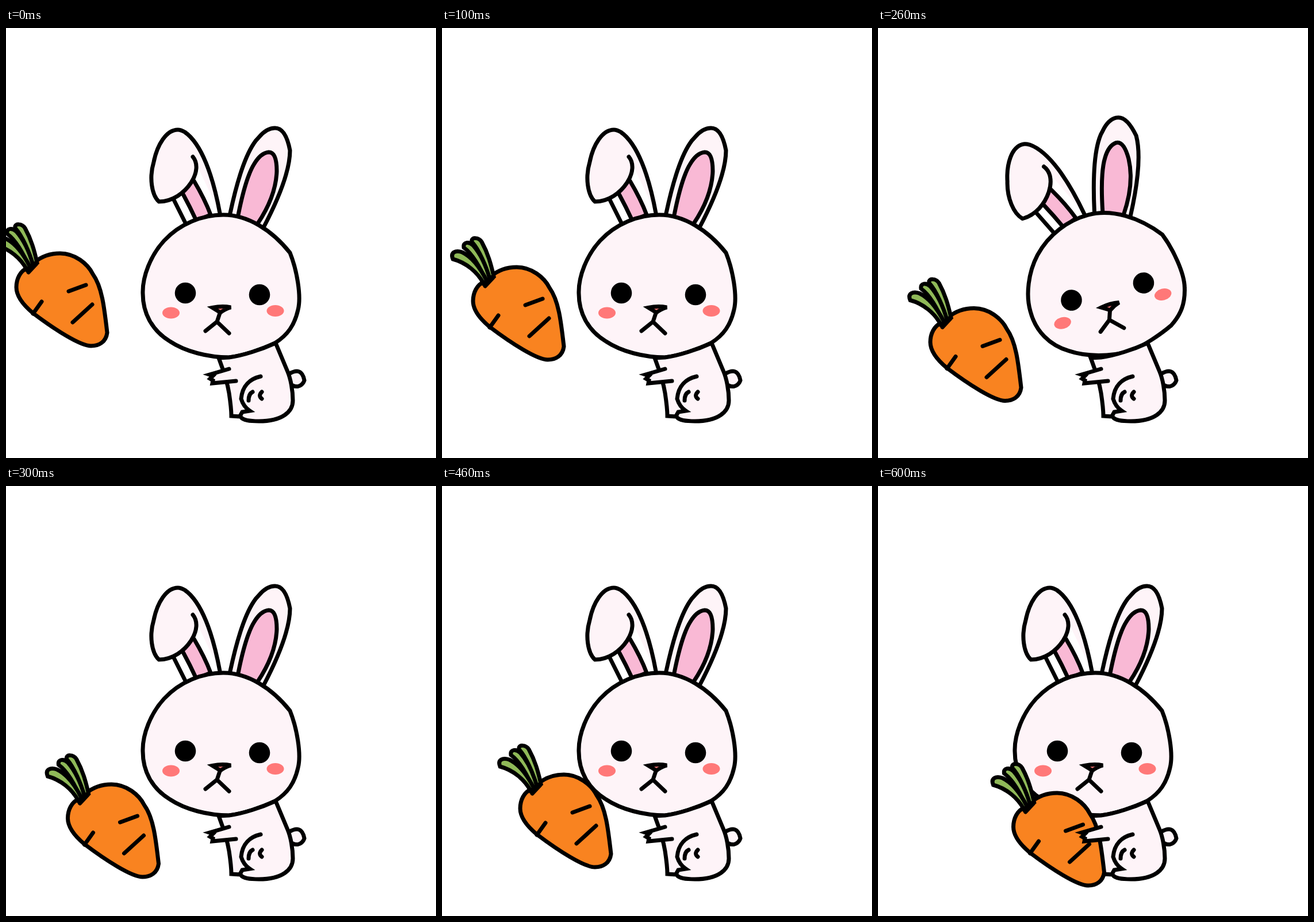
Write an HTML page that moves like this. It is 748 by 748 pixels and loops after 0.7 s.

```html
<!DOCTYPE html>
<html lang="en">
<head>
<meta charset="utf-8">
<title>Rabbit and carrot</title>
<style>
  html, body { margin: 0; width: 100%; height: 100%; overflow: hidden; background: #fff; }
  svg { display: block; width: 100%; height: 100%; }
  path { stroke: #000; stroke-width: 7; stroke-linecap: round; fill: none; }
  .fur { fill: #fef4f8; }
  .pink { fill: #f9b9d5; }
  .blush { fill: #ff7878; }
  .root { fill: #f98320; }
  .leaf { fill: #8fb958; }
</style>
</head>
<body>
<svg viewBox="0 0 748 748">
  <g id="head">
    <!-- folded ear -->
    <path d="M292 299L313 341"/>
    <path class="pink" d="M308 289Q320 311 331 335L356 325Q346 298 327 266"/>
    <path class="fur" d="M325 224C334 235 333 252 322 269C310 287 290 302 266 302C253 290 249 260 257 233C263 203 279 177 299 177Q304 177 311 181C340 201 360 257 372 322"/>
    <!-- upright ear -->
    <path class="fur" d="M390 322C399 280 413 228 431 201Q434 196 440 190C450 178 460 174 468 174C482 174 490 192 494 213C494 250 470 305 448 347"/>
    <path class="pink" d="M404 325C410 295 420 255 432 236C438 226 447 217 457 216C466 216 471 225 471 249C470 280 458 310 438 340"/>
    <!-- face -->
    <path class="fur" d="M494 391C506 421 514 466 508 490C502 517 490 534 468 548C445 559 412 570 388 573C352 573 312 563 285 545C255 527 238 497 238 462C237 432 252 395 275 370C303 340 342 325 378 325C421 325 463 352 494 391Z"/>
    <circle cx="312" cy="461" r="18.3"/>
    <circle cx="441" cy="464" r="18.3"/>
    <ellipse class="blush" cx="287" cy="495.500" rx="15" ry="10"/>
    <ellipse class="blush" cx="468.500" cy="492" rx="15" ry="10"/>
    <path class="blush" d="M359 486.500Q376 483 391 486Q381 489 373 495Z"/>
    <path d="M372 496L367 511L347 527M367 511L388 531"/>
  </g>
  <path class="fur" d="M492 602Q500 597 506 597C514 597 518 606 519 613C516 622 507 626 499 622"/>
  <path class="fur" d="M370 574C376 590 384 610 388 635C391 655 392 665 392 675L408 676C412 683 425 684 440 684C480 684 499 668 499 648C499 630 495 610 490 598L469 548C445 559 412 570 388 573Z"/>
  <path d="M443 606C425 610 411 622 409 645C412 655 418 662 424 666L411 668L407 675M429 633C423 636 422 642 422 648M445 633C440 638 441 642 445 645"/>
  <g id="carrot">
    <path class="root" d="M85 432C98 421 114 416 130 416C156 416 178 434 187 452C203 474 207 510 212 554C210 570 198 577 184 577C165 577 120 548 83 520C65 505 54 490 54 475C54 460 61 447 72 442Z"/>
    <path d="M145 482L175 471M152 536L186 505M98 500L83 521"/>
    <path class="leaf" d="M80 436C78 415 64 385 52 372C50 363 64 364 69 372C80 392 85 410 90 432Z"/>
    <path class="leaf" d="M76 440C66 415 52 392 38 382C36 372 47 371 54 378C68 394 77 415 83 436Z"/>
    <path class="leaf" d="M72 444C62 425 42 408 19 402C14 390 24 386 35 390C56 400 70 424 78 440Z"/>
    <path d="M75 449L89 434"/>
  </g>
  <path class="fur" d="M388 593L354 603L360 605L355 610L360 613L359 618L400 614"/>
</svg>
<script>
  const head = document.getElementById('head');
  const carrot = document.getElementById('carrot');
  const STEP = 100;
  const route = [[-36, -24], [0, 0], [37, 71.5], [53.5, 103], [82, 86], [146, 94.5], [181.5, 118]];
  const upright = 'translate(0 0)';
  const tilted = 'matrix(.9668 -.2554 .2554 .9668 -82.9 107.5)';

  function draw(now) {
    const pose = Math.floor(now / STEP) % route.length;
    head.setAttribute('transform', pose % 3 === 2 ? tilted : upright);
    carrot.setAttribute('transform', `translate(${route[pose]})`);
  }

  const start = performance.now();
  function tick() {
    draw(performance.now() - start);
    requestAnimationFrame(tick);
  }
  tick();
</script>
</body>
</html>
```
